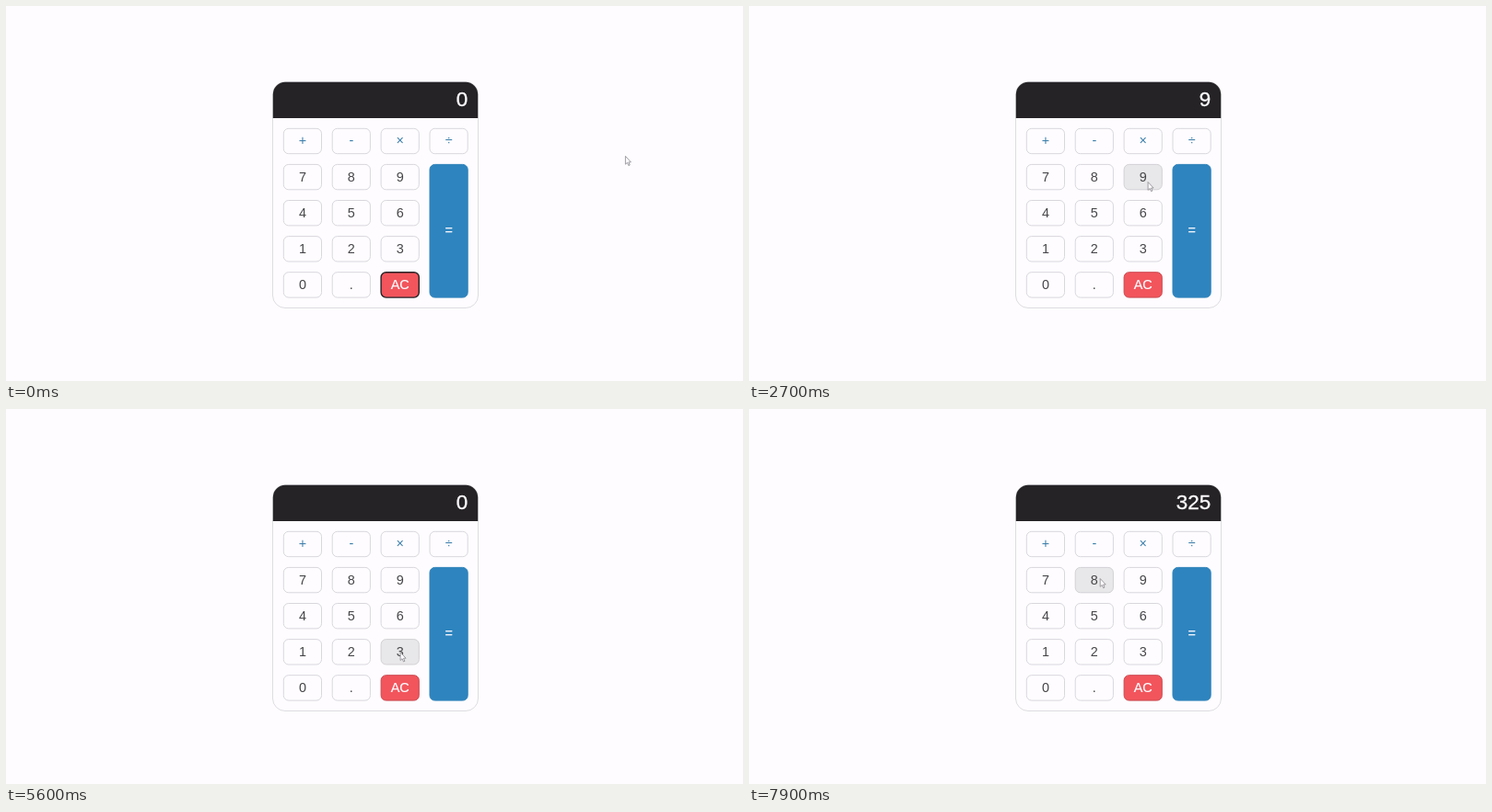
An HTML page that plays this animation: 800 px wide and 408 px high, repeating every 8000 ms.

```html
<!DOCTYPE html>
<html lang="en">
<head>
<meta charset="utf-8">
<title>Calculator</title>
<style>
  html, body { margin: 0; width: 100%; height: 100%; overflow: hidden; background: #fefcff; }
  svg { display: block; width: 800px; height: 408px; }
  text { font: 14.4px "Liberation Sans", Arial, sans-serif; text-anchor: middle; fill: #464548; }
  .key { fill: #fefcff; stroke: #d8d7dc; }
  .key.hover { fill: #e8e7e9; stroke: #d2d1d4; }
  .op { fill: #3b7eaa; }
  .equals { fill: #2e84be; stroke: #2e82ba; }
  .equals.hover { fill: #4d9bd3; stroke: #4694cc; }
  .clear { fill: #f2555c; stroke: #c9484f; }
  .clear.hover { fill: #f4737a; }
  .clear.focus { stroke: #252326; stroke-width: 1.4; }
  .light { fill: #fefcff; stroke: #fefcff; stroke-width: .2; }
  #display { font-size: 22.4px; text-anchor: end; stroke-width: .35; }
</style>
</head>
<body>
<svg viewBox="0 0 800 408">
  <rect x="289.5" y="82.5" width="223" height="246" rx="13.5" fill="#fefcff" stroke="#dddce0"/>
  <path d="M289.8 122V96a13.2 13.2 0 0 1 13.2-13.2H499A13.2 13.2 0 0 1 512.2 96V122Z" fill="#252326"/>
  <text id="display" class="light" x="501.2" y="109.4">0</text>
  <g id="keys"></g>
  <path id="cursor" d="M.4 .4V9.2L2.4 7.4L3.8 10.6L5.2 10L3.8 6.9H6.4Z"
        fill="#fefcff" stroke="#88878c" stroke-width=".8" stroke-linejoin="round"/>
</svg>
<script>
const LOOP = 8000, STEP = 100, GAP_X = 52.9, GAP_Y = 39.1;
const keysGroup = document.getElementById('keys');
const display = document.getElementById('display');
const cursor = document.getElementById('cursor');

function add(tag, attrs) {
  const el = document.createElementNS('http://www.w3.org/2000/svg', tag);
  for (const name in attrs) el.setAttribute(name, attrs[name]);
  return keysGroup.appendChild(el);
}

const keys = {};
function addKey(label, col, row, rows = 1, kind = '', textKind = '') {
  const w = 41.2, h = 27.4 + (rows - 1) * GAP_Y;
  const x = 301.3 + col * GAP_X, y = 133.3 + row * GAP_Y;
  const cx = x + w / 2, cy = y + h / 2;
  const el = add('rect', { x, y, width: w, height: h, rx: 5.5, class: 'key ' + kind });
  const baseline = cy + ('+-×÷='.includes(label) ? 4.4 : 4.9);
  add('text', { x: cx, y: baseline, class: textKind }).textContent = label;
  const contains = (px, py) => Math.abs(px - cx) < w / 2 && Math.abs(py - cy) < h / 2;
  keys[label] = { el, cx, cy, contains };
}

['+-×÷', '789', '456', '123', '0.'].forEach((labels, row) =>
  [...labels].forEach((label, col) => addKey(label, col, row, 1, '', row ? '' : 'op')));
addKey('AC', 2, 4, 1, 'clear', 'light');
addKey('=', 3, 1, 4, 'equals', 'light');

// The pointer glides to each key and presses it on leaving, unless idle
const visits = [
  { key: '4', from: 0, to: 800, dy: -22, idle: true },
  { key: '8', from: 800, to: 1100 },
  { key: '5', from: 1200, to: 1500, dx: 15 },
  { key: '6', from: 1500, to: 1800 },
  { key: '×', from: 1800, to: 2200 },
  { key: '9', from: 2300, to: 2600, dx: 5, dy: 5 },
  { key: '=', from: 2700, to: 3100, dx: -10, dy: 47 },
  { key: '9', from: 3500, to: 4200, idle: true },
  { key: 'AC', from: 4700, to: 5100 },
  { key: '3', from: 5300, to: 5600 },
  { key: '2', from: 5700, to: 5900 },
  { key: '5', from: 6000, to: 6200 },
  { key: '÷', from: 6200, to: 6700, dx: -12, dy: -9 },
  { key: '9', from: 6900, to: 7300, dx: 22, dy: 18, idle: true },
  { key: '2', from: 7300, to: 7600, dx: 12, dy: -9, idle: true },
  { key: '8', from: 7600, to: 7900, dx: 6, dy: -2, idle: true }
];
const presses = visits.slice(0, -1)
  .map((v, i) => ({ ...v, at: visits[i + 1].from }))
  .filter(v => !v.idle);

const easeOut = p => 1 - (1 - p) ** 2;

function pointerAt(t) {
  let x = 672, y = 163;
  for (const { key, from, to, dx = 0, dy = 0 } of visits) {
    if (t <= from) break;
    const k = easeOut(Math.min(1, (t - from) / (to - from)));
    x += (keys[key].cx + dx - x) * k;
    y += (keys[key].cy + dy - y) * k;
  }
  return [x, y];
}

const operators = {
  '+': (a, b) => a + b,
  '-': (a, b) => a - b,
  '×': (a, b) => a * b,
  '÷': (a, b) => a / b
};

function readingAt(t) {
  let shown = '0', stored = 0, op = null, fresh = true;
  for (const { key, at } of presses) {
    if (at > t) break;
    if (key === 'AC') {
      shown = '0';
      op = null;
    } else if (key === '=') {
      if (op) shown = String(operators[op](stored, +shown));
      op = null;
    } else if (operators[key]) {
      stored = +shown;
      op = key;
    } else {
      shown = fresh ? key : shown + key;
      fresh = false;
      continue;
    }
    fresh = true;
  }
  return shown;
}

function render(now) {
  const t = Math.floor(now % LOOP / STEP) * STEP;
  cursor.setAttribute('transform', `translate(${pointerAt(t)})`);
  display.textContent = readingAt(t);

  // Highlights trail the pointer by one step
  const trail = pointerAt(t - STEP);
  for (const key of Object.values(keys)) key.el.classList.toggle('hover', key.contains(...trail));
  keys.AC.el.classList.toggle('focus', t < presses[0].at);
}

const start = performance.now();
function tick() {
  render(performance.now() - start);
  requestAnimationFrame(tick);
}
tick();
</script>
</body>
</html>
```
